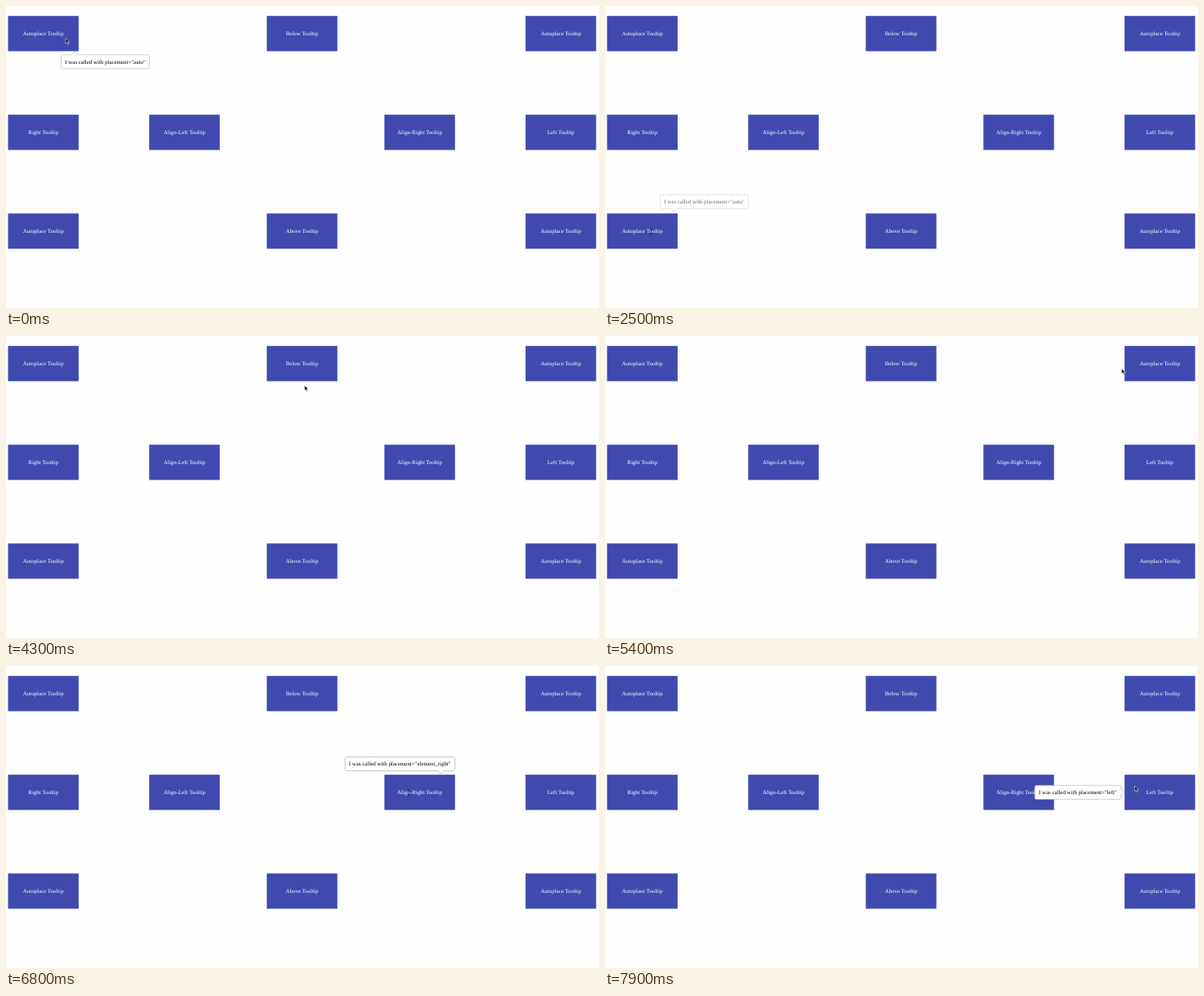
These frames come from a looping animation (726x370 px, 8 s). An HTML page:

```html
<!DOCTYPE html>
<html lang="en">
<head>
<meta charset="utf-8">
<title>Tooltip placement</title>
<style>
html, body { margin: 0; width: 100%; height: 100%; overflow: hidden; background: #fefefe; }
svg { display: block; width: 726px; height: 370px; }
text { font: 6.91px "Liberation Serif", "Times New Roman", serif; text-rendering: geometricPrecision; }
</style>
</head>
<body>
<svg id="stage" viewBox="0 0 726 370"></svg>
<script>
const LOOP = 8000, STEP = 100;
const BTN_W = 86.4, BTN_H = 43.2, TIP_H = 17;
const stage = document.getElementById('stage');

function add(parent, tag, attrs, text) {
  const el = document.createElementNS('http://www.w3.org/2000/svg', tag);
  for (const key in attrs) el.setAttribute(key, attrs[key]);
  if (text) el.textContent = text;
  return parent.appendChild(el);
}

// Buttons: label, left, top
const cols = [2.5, 175.3, 319.3, 463.3, 636.1];
const rows = [12.2, 133.2, 254.2];
const buttons = [
  ['Autoplace', 0, 0], ['Below', 2, 0], ['Autoplace', 4, 0],
  ['Right', 0, 1], ['Align-Left', 1, 1], ['Align-Right', 3, 1], ['Left', 4, 1],
  ['Autoplace', 0, 2], ['Above', 2, 2], ['Autoplace', 4, 2]
];
const labels = buttons.map(([name, c, r]) => {
  const x = cols[c], y = rows[r];
  add(stage, 'rect', { x, y, width: BTN_W, height: BTN_H, fill: '#4049ae' });
  const label = add(stage, 'text', {
    x: x + BTN_W / 2, y: y + 23.8, 'text-anchor': 'middle', fill: '#fff'
  }, name + ' Tooltip');
  return { label, cx: x + BTN_W / 2, cy: y + BTN_H / 2 };
});

// Tooltips: placement, box, arrow position and turn, fade-in start/end, fade-out start/end
const tips = [
  { name: 'auto', x: 67.6, y: 59.8, w: 108, ax: 84, turn: 0, fade: [-300, -1, 150, 450], edge: '#a9cf9b' },
  { name: 'right', x: 93.3, y: 146.3, w: 109.4, turn: 270, fade: [850, 1150, 1950, 2250], edge: '#b4bcb4' },
  { name: 'auto', x: 67.6, y: 231.2, w: 108, ax: 84, turn: 180, fade: [2300, 2650, 2950, 3250], edge: '#b4bcb4' },
  { name: 'above', x: 306.2, y: 231.2, w: 112.6, ax: 362.5, turn: 180, fade: [3400, 3700, 3900, 4200], edge: '#b4bcb4' },
  { name: 'below', x: 306, y: 59.8, w: 113, ax: 362.5, turn: 0, fade: [4400, 4700, 4850, 5150], edge: '#b4bcb4' },
  { name: 'auto', x: 549.6, y: 59.8, w: 108, ax: 641, turn: 0, fade: [5500, 5800, 6150, 6450], edge: '#a9cf9b' },
  { name: 'element_right', x: 415, y: 111.5, w: 134.6, ax: 532.5, turn: 180, fade: [6450, 6800, 7050, 7350], edge: '#a5bfa5' },
  { name: 'left', x: 526.2, y: 146.3, w: 105.8, turn: 90, fade: [7450, 7800, 9000, 9300], edge: '#b4bcb4' }
];
for (const tip of tips) {
  const { x, y, w, turn } = tip;
  const paint = { fill: '#fff', stroke: tip.edge, 'stroke-width': 0.7 };
  tip.el = add(stage, 'g', {});
  add(tip.el, 'rect', { x, y, width: w, height: TIP_H, rx: 1.8, ...paint });
  const ax = turn === 270 ? x : turn === 90 ? x + w : tip.ax;
  const ay = turn === 0 ? y : turn === 180 ? y + TIP_H : y + TIP_H / 2;
  add(tip.el, 'path', {
    d: 'M-4.2 .4L0 -3.8L4.2 .4', transform: `translate(${ax} ${ay}) rotate(${turn})`, ...paint
  });
  add(tip.el, 'text', { x: x + 4.7, y: y + 10.8, fill: '#000' },
    `I was called with placement="${tip.name}"`);
}

const arrow = add(stage, 'path', {
  d: 'M0 0V6.4L1.5 5L2.6 7.5L3.7 7L2.6 4.6H4.6Z',
  fill: '#111', stroke: '#fff', 'stroke-width': 0.5, 'stroke-linejoin': 'round'
});
const beam = add(stage, 'path', {
  d: 'M-1.2 -3.6Q0 -3.6 0 -2.8V2.8Q0 3.6 -1.2 3.6M1.2 -3.6Q0 -3.6 0 -2.8M0 2.8Q0 3.6 1.2 3.6',
  fill: 'none', stroke: '#1c1f3c', 'stroke-width': 0.7
});

// Pointer stops: time, x, y
const path = [
  [0, 73, 39.5], [100, 72.5, 42], [800, 58, 148], [1000, 57, 155],
  [1850, 57, 155], [2400, 56.8, 276], [2850, 56.8, 276], [3550, 367, 269],
  [3850, 367, 269], [4300, 365.5, 60.5], [4500, 366, 40], [4750, 367, 39],
  [5400, 632.5, 40], [5600, 650, 39.5], [6050, 650, 39.5], [6500, 497, 138],
  [6600, 493, 155], [6950, 493, 155], [7600, 647, 147.5], [7800, 648.5, 147], [8000, 648.5, 147]
];

const clamp = v => Math.max(0, Math.min(1, v));
const smooth = k => k * k * (3 - 2 * k);

function pointerAt(t) {
  const i = path.findIndex(stop => stop[0] > t);
  const [t0, x0, y0] = path[i - 1], [t1, x1, y1] = path[i];
  const k = smooth((t - t0) / (t1 - t0));
  return [x0 + (x1 - x0) * k, y0 + (y1 - y0) * k];
}

function overLabel(x, y) {
  return labels.some(({ label, cx, cy }) =>
    Math.abs(x - cx) < label.getComputedTextLength() / 2 && Math.abs(y - cy) < 4);
}

function draw(t) {
  for (const { el, fade: [a, b, c, d] } of tips) {
    const alpha = clamp((t - a) / (b - a)) * (1 - clamp((t - c) / (d - c)));
    el.setAttribute('opacity', alpha);
  }
  const [x, y] = pointerAt(t);
  const text = overLabel(x, y);
  for (const el of [arrow, beam]) {
    el.setAttribute('transform', `translate(${x} ${y})`);
    el.setAttribute('visibility', (el === beam) === text ? 'visible' : 'hidden');
  }
}

const start = performance.now();
function tick() {
  const t = (performance.now() - start) % LOOP;
  draw(Math.floor(t / STEP) * STEP);
  requestAnimationFrame(tick);
}
tick();
</script>
</body>
</html>
```
